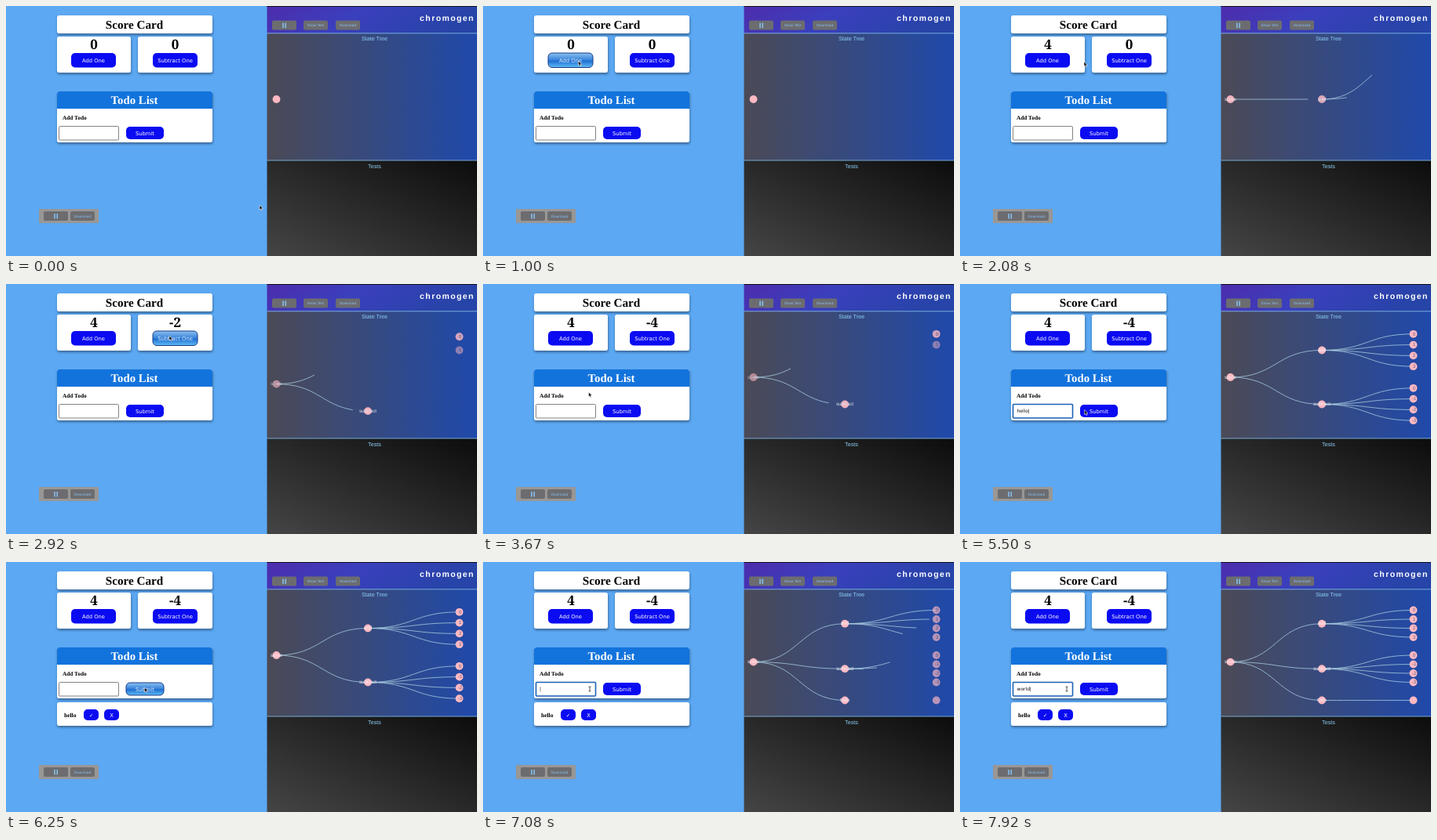
Recreate the animation shown at these times as an HTML page. Size 600x319 px, loop 8 s.

```html
<!DOCTYPE html>
<html lang="en">
<head>
<meta charset="utf-8">
<title>State recorder demo</title>
<style>
  html, body { margin: 0; width: 100%; height: 100%; overflow: hidden; background: #5ca8f3; }
  svg { display: block; width: 100vw; height: 100vh; }
  text { text-anchor: middle; text-rendering: geometricPrecision; }
  .serif { font-family: "Liberation Serif", "Times New Roman", serif; font-weight: bold; }
  .ui { font-family: "DejaVu Sans", Verdana, sans-serif; font-size: 6.75px; fill: #fff; }
  .panel { font-family: "Liberation Sans", Arial, sans-serif; font-size: 7.2px; fill: #8fd0f8; }
  .score { font-family: "Noto Serif", serif; font-weight: 900; font-size: 17px; }
  .start { text-anchor: start; }
  .tiny { font-size: 4.3px; fill: #86c3f3; }
  .card { fill: #fff; filter: url(#shadow); }
  .node { font-family: "Liberation Sans", Arial, sans-serif; font-size: 6.2px; fill: #eef1f8; }
  .leaf { fill: #62627a; }
  .link { fill: none; stroke: #a6cbe0; stroke-width: .8; }
</style>
</head>
<body>
<svg viewBox="0 0 600 319" preserveAspectRatio="none">
  <defs>
    <filter id="shadow" x="-10%" y="-30%" width="120%" height="170%">
      <feDropShadow dx="0.5" dy="2" stdDeviation="1.6" flood-color="#123" flood-opacity=".5"/>
    </filter>
    <linearGradient id="header" x2="1" y2=".2">
      <stop stop-color="#4d2cac"/><stop offset=".45" stop-color="#3b3fbd"/><stop offset="1" stop-color="#2744a8"/>
    </linearGradient>
    <linearGradient id="tree">
      <stop stop-color="#4b4a56"/><stop offset=".5" stop-color="#364a80"/><stop offset="1" stop-color="#1f49ab"/>
    </linearGradient>
    <linearGradient id="tests" x1="0" y1="1" x2="1" y2="0">
      <stop stop-color="#454545"/><stop offset="1" stop-color="#0c0c0c"/>
    </linearGradient>
    <linearGradient id="pressed" x2="0" y2="1">
      <stop stop-color="#8cc0f0"/><stop offset=".45" stop-color="#3d88dc"/>
      <stop offset=".55" stop-color="#1f70d2"/><stop offset="1" stop-color="#62bdf6"/>
    </linearGradient>
  </defs>

  <rect width="333" height="319" fill="#5ca8f3"/>
  <rect class="card" x="65" y="12" width="198" height="23" rx="3"/>
  <text class="serif" x="163.5" y="28.5" font-size="15.2">Score Card</text>
  <rect class="card" x="65" y="39" width="94" height="46" rx="3"/>
  <rect class="card" x="168" y="39" width="95" height="46" rx="3"/>
  <rect class="card" x="65" y="109" width="198" height="65" rx="3"/>
  <path d="M65 131V112q0-3 3-3H260q3 0 3 3V131Z" fill="#1273dc"/>
  <text class="serif" x="163.5" y="125.3" font-size="14.8" fill="#fff">Todo List</text>
  <text class="serif start" x="72" y="145" font-size="7.3">Add Todo</text>

  <rect x="332.5" width="268" height="35" fill="url(#header)"/>
  <rect x="332.5" width="268" height="1" fill="#15151c"/>
  <rect x="332.5" y="35" width="268" height="162" fill="url(#tree)"/>
  <rect x="332.5" y="197" width="268" height="122" fill="url(#tests)"/>
  <path d="M332.5 34.8H600M332.5 197H600" stroke="#7fb9e4" stroke-width=".9"/>
  <text class="panel" x="562" y="19" style="font-size:10.5px;letter-spacing:1.4px;font-weight:bold;fill:#fff">chromogen</text>
  <text class="panel" x="469.5" y="44.3">State Tree</text>
  <text class="panel" x="469.5" y="206.7">Tests</text>
  <rect x="42" y="259" width="76" height="18" rx="1" fill="#999795"/>
  <g id="tools"></g>
  <g id="live"></g>
</svg>

<script>
const LOOP = 8000, STEP = 1000 / 12;
const live = document.getElementById("live");
const clamp = v => Math.max(0, Math.min(1, v));
const count = (times, t) => times.filter(at => t >= at).length;
const text = (cls, x, y, s, extra = "") => `<text class="${cls}" x="${x}" y="${y}" ${extra}>${s}</text>`;
const box = (x, y, w, h, r, fill, extra = "") =>
  `<rect x="${x}" y="${y}" width="${w}" height="${h}" rx="${r}" fill="${fill}" ${extra}/>`;

const tool = (x, y, label) => box(x, y, 31, 12, 2, "#6c6c70") + (label
  ? text("ui tiny", x + 15.5, y + 7.6, label)
  : `<path d="M${x + 14} ${y + 3}v6.5m3.2 0v-6.5" stroke="#86c3f3" stroke-width="1.5"/>`);
document.getElementById("tools").innerHTML =
  tool(48, 262) + tool(82, 262, "Download") +
  tool(339, 18.5) + tool(379, 18.5, "Show Test") + tool(420, 18.5, "Download");

// Timeline, in ms
const ADDS = [1080, 1250, 1415, 1660];
const SUBS = [2330, 2495, 3000, 3250];
const SUBMIT = 6250, TODO_DRAWN = 6330;
const WORDS = [
  { word: "hello", keys: [4410, 4500, 4740, 4910, 5080], focus: [3910, 6160] },
  { word: "world", keys: [7160, 7330, 7410, 7580, 7740], focus: [7080, LOOP] },
];
const POINTER = [ // time, x, y
  [0, 323, 254], [80, 323, 254], [750, 124, 73], [920, 121.5, 70], [1750, 121.5, 70],
  [2080, 158, 71], [2330, 208, 66], [3330, 208, 66], [3830, 110, 162], [5170, 110, 162],
  [5670, 176.5, 160], [6500, 176.5, 160], [7000, 136, 162], [LOOP, 136, 162],
];
const POINTER_HIDDEN = [4330, 5170];

// A tidy tree: one unit between siblings, two between cousins
function layout(adds, subs, todos) {
  const groups = [["add", adds, 1], ["subtract", subs, -1], ["todo", todos, 0]].filter(g => g[1]);
  const root = { x: 344.5, y: 119, label: "score", depth: 0 };
  if (!groups.length) return { nodes: [root], links: [] };
  const margin = groups.length > 1 ? 1 : .5;
  const span = groups.reduce((sum, g) => sum + g[1] + 1, -2);
  const unit = 138 / (span + 2 * margin);
  const inner = [], leaves = [], inLinks = [], outLinks = [];
  let at = margin;
  for (const [label, size, sign] of groups) {
    const parent = { x: 461, y: 50 + unit * (at + (size - 1) / 2), label, depth: 1 };
    inner.push(parent);
    inLinks.push([root, parent]);
    for (let i = 0; i < size; i++) {
      const leaf = { x: 577.5, y: 50 + unit * (at + i), label: sign ? String(sign * i) : "", depth: 2 };
      leaves.push(leaf);
      outLinks.push([parent, leaf]);
    }
    at += size + 1;
  }
  root.y = (inner[0].y + inner[inner.length - 1].y) / 2;
  return { nodes: [root, ...inner, ...leaves], links: [...inLinks, ...outLinks] };
}

function drawTree(t) {
  const adds = count(ADDS, t), subs = count(SUBS, t), todos = +(t >= TODO_DRAWN);
  const changed = Math.max(-1e4, ...[...ADDS, ...SUBS, TODO_DRAWN].filter(at => at <= t));
  const age = t - changed, { nodes, links } = layout(adds, subs, todos);
  const crossed = subs > 0 && !todos; // with two branches the newer one is drawn first
  const linkDelay = i => 145 * (crossed ? [1.5, 0][i] ?? i + 1 : i * (todos ? .5 : 1));
  const nodeDelay = (n, i) => crossed ? [150, 450, 0, 50, 200][i] ?? 450 : [0, 50, 450][n.depth];

  const paths = links.map(([a, b], i) => {
    const shown = clamp((age - linkDelay(i)) / 500), mid = (a.x + b.x) / 2;
    return shown && `<path class="link" pathLength="1" stroke-dasharray="${shown} 2"
      d="M${a.x} ${a.y}C${mid} ${a.y} ${mid} ${b.y} ${b.x} ${b.y}"/>`;
  });
  const dots = nodes.map((n, i) => {
    const shown = adds ? clamp((age - nodeDelay(n, i)) / 450) : 1;
    const label = adds ? text(n.depth > 1 ? "node leaf" : "node", n.x + (n.depth > 1 ? 1 : 0), n.y + 1.7, n.label) : "";
    return `<g opacity="${shown}"><circle cx="${n.x}" cy="${n.y}" r="4.9" fill="#ffb9c3"/>${label}</g>`;
  });
  return paths.filter(Boolean).join("") + dots.join("");
}

const button = (x, y, w, h, label, down) =>
  box(x, y, w, h, 5, down ? "url(#pressed)" : "#0b0bf2", down ? 'stroke="#173a86" stroke-width="1"' : "") +
  text("ui", x + w / 2, y + h / 2 + 2.5, label, down ? 'opacity=".85"' : "");

const isDown = (times, t) => times.some(at => t >= at - 85 && t < at);

function drawForm(t) {
  const adds = count(ADDS, t), subs = count(SUBS, t);
  const entry = WORDS.find(w => t >= w.focus[0] && t < w.focus[1]);
  let out = text("score", 112, 55, adds) + text("score", 215.5, 55, subs ? -subs : 0) +
    button(83, 60, 57, 18.5, "Add One", isDown(ADDS, t)) +
    button(187, 60, 57, 18.5, "Subtract One", isDown(SUBS, t)) +
    button(153, 154, 48, 16, "Submit", t >= SUBMIT - 90 && t < SUBMIT + 80) +
    box(67.5, 153.5, 76, 17.5, 1, "#fff", entry ? 'stroke="#1b62b5" stroke-width="1.6"' : 'stroke="#777" stroke-width=".9"');
  if (entry) {
    const typed = entry.word.slice(0, count(entry.keys, t));
    out += `<text class="ui start" x="72.5" y="164.3" style="font-size:6px;fill:#111">${typed}<tspan dx="-.6" dy="-.3">|</tspan></text>`;
  }
  if (t >= SUBMIT) {
    out += '<rect class="card" x="65" y="179" width="198" height="30" rx="3"/>' +
      text("serif start", 74, 198, "hello", 'font-size="7.5"') +
      button(99, 188, 19, 14, "✓") + button(125, 188, 19, 14, "X");
  }
  return out;
}

function drawPointer(t) {
  if (t >= POINTER_HIDDEN[0] && t < POINTER_HIDDEN[1]) return "";
  const i = POINTER.findIndex(p => p[0] > t);
  const [t0, x0, y0] = POINTER[i - 1], [t1, x1, y1] = POINTER[i];
  const p = (t - t0) / (t1 - t0), ease = p * p * (3 - 2 * p);
  const x = x0 + (x1 - x0) * ease, y = y0 + (y1 - y0) * ease;
  const overInput = x > 67 && x < 144 && y > 153 && y < 171;
  const shape = overInput
    ? '<path d="M-1.5-3Q0-3 0-2Q0-3 1.5-3M0-2V2M-1.5 3Q0 3 0 2Q0 3 1.5 3" fill="none" stroke="#222" stroke-width=".8"/>'
    : '<path d="M0 0V6L1.4 4.8L2.4 7L3.4 6.5L2.5 4.4H4.3Z" stroke="#fff" stroke-width=".6"/>';
  return `<g transform="translate(${x} ${y})">${shape}</g>`;
}

let last = -1;
function frame(now) {
  const step = Math.floor((now % LOOP) / STEP + .05) % 96;
  if (step !== last) {
    last = step;
    const t = step * STEP;
    live.innerHTML = drawTree(t) + drawForm(t) + drawPointer(t);
  }
  requestAnimationFrame(frame);
}
frame(0);
</script>
</body>
</html>
```
